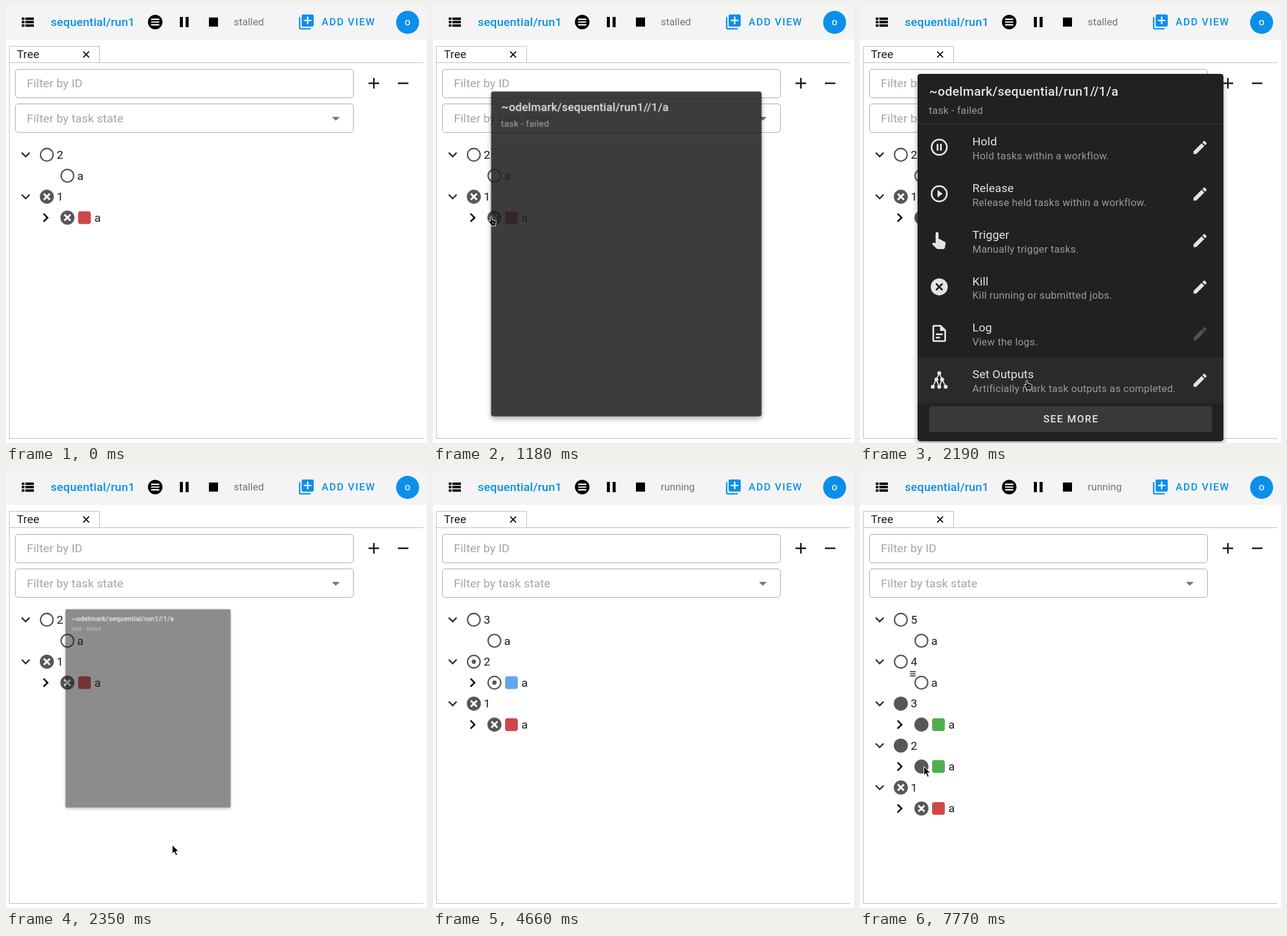
Write an HTML page that moves like this. It is 695 px wide and 721 px high and loops after 8000 ms.

```html
<!DOCTYPE html>
<html lang="en">
<head>
<meta charset="utf-8">
<title>Workflow tree</title>
<style>
  html, body { margin: 0; width: 100%; height: 100%; overflow: hidden; background: #fff; }
  svg { display: block; font: 19.2px Roboto, sans-serif; }
  text { white-space: pre; }
  .line { fill: none; stroke: currentColor; }
  .medium { font-weight: 500; }
  .caps { font-size: 16.8px; font-weight: 500; letter-spacing: 1.5px; }
  .hint { fill: #a5a5a5; letter-spacing: .15px; }
  .sub { font-size: 16.8px; letter-spacing: .27px; fill: #9a9a9a; }
  #menu { color: #e4e4e4; fill: #e4e4e4; }
  #panel { filter: drop-shadow(0 5px 5px rgba(0, 0, 0, .35)); }
</style>
</head>
<body>
<svg width="695" height="721" viewBox="0 0 695 721">
  <!-- toolbar -->
  <rect width="695" height="56" fill="#f4f4f4"/>
  <path d="M26 19h4.5v4H26zm6 0h14v4H32zM26 24.6h4.5v4H26zm6 0h14v4H32zM26 30.2h4.5v4H26zm6 0h14v4H32z"/>
  <text class="medium" x="74" y="33" fill="#0a90ea" letter-spacing=".18">sequential/run1</text>
  <circle cx="246.3" cy="26.5" r="12"/>
  <path d="M239.5 21.8h13.6M239.5 26.5h13.6M239.5 31.2h13.6" stroke="#fff" stroke-width="2.2"/>
  <path d="M287 18h5v17h-5zm9.5 0h5v17h-5zM335 19h15v15h-15z"/>
  <text id="status" x="376" y="32" font-size="16.8" fill="#757575"></text>
  <g fill="#0a90ea">
    <rect x="488" y="14" width="20" height="20" rx="2.4"/>
    <path class="line" d="M484.8 18.5V36q0 1.6 1.6 1.6H503" color="#0a90ea" stroke-width="2.3"/>
    <path d="M498 17.5v12.6M491.7 23.8h12.6" stroke="#fff" stroke-width="2.3"/>
    <text class="caps" x="521" y="32">ADD VIEW</text>
    <circle cx="663" cy="27" r="19"/>
  </g>
  <text class="medium" x="663" y="31.7" font-size="13.5" fill="#fff" text-anchor="middle">O</text>

  <!-- tab and filters -->
  <path class="line" d="M689 93.5H154.5V66.5H5.5V713.5H689M5.5 93.5H154.5" color="#bdbdbd"/>
  <text x="18" y="86" font-size="18.8" fill="#1c1c1c" letter-spacing=".1">Tree</text>
  <path class="line" d="M127.5 75.2l9.6 9.6m0-9.6l-9.6 9.6" stroke-width="1.8"/>
  <g class="line" color="#a9a9a9">
    <rect x="15.5" y="104.5" width="558" height="47" rx="4.5"/>
    <rect x="15.5" y="161.5" width="558" height="47" rx="4.5"/>
  </g>
  <text class="hint" x="34.5" y="134">Filter by ID</text>
  <text class="hint" x="34.5" y="192">Filter by task state</text>
  <path d="M538 183h13l-6.5 6.3z" fill="#757575"/>
  <path class="line" d="M598.5 127.5h17.5m-8.7-8.7v17.4M647 127.5h17.3" color="#151515" stroke-width="2.5"/>

  <g id="tree" fill="#1c1c1c"></g>

  <g id="menu">
    <rect id="panel" x="95" y="112" width="505" height="606" rx="4.5" fill="#212121"/>
    <text class="medium" x="114" y="148" font-size="21" letter-spacing=".25">~odelmark/sequential/run1//1/a</text>
    <text class="sub" x="113.5" y="178">task - failed</text>
    <path d="M95 194.5h505" stroke="#373737"/>
    <g id="items"></g>
  </g>

  <g id="cursor" stroke="#fff">
    <path id="arrow" d="M0 0V14.6l3.4-3 2.5 5.8 2.5-1.1-2.5-5.7h4.7z"/>
    <g id="hand">
      <path d="M3.6 1.5Q5 -.4 6.4 1.5V5.8l5.4 1.3q1.7.5 1.5 2.2l-.9 4v2.6H4.6v-2.2L1 9.2Q.2 7.2 2 7.3l1.6 1.2z"/>
      <path d="M7.2 9.5v3M9.7 9.5v3" stroke-width=".8"/>
    </g>
  </g>
</svg>
<script>
const LOOP = 8000;
const MENU_OPEN = 1010, ENTER = 305, MENU_CLOSE = 2244, LEAVE = 169;
const ORIGIN = [101.6, 364], ROW = 76.8, ITEMS_TOP = 195;
const $ = id => document.getElementById(id);
const clamp = v => Math.min(1, Math.max(0, v));

// cubic-bezier(x1, 0, x2, 1)
function ease(x, x1, x2) {
  x = clamp(x);
  let lo = 0, hi = 1, s;
  for (let i = 0; i < 24; i++) {
    s = (lo + hi) / 2;
    if (3 * (1 - s) ** 2 * s * x1 + 3 * (1 - s) * s * s * x2 + s ** 3 < x) lo = s; else hi = s;
  }
  return s * s * (3 - 2 * s);
}

// Menu entries; icons live in a 24 unit box
const RING = '<circle class="line" cx="12" cy="12" r="9" stroke-width="2"/>';
const ENTRIES = [
  ['Hold', 'Hold tasks within a workflow.', RING + '<path d="M9 8h2v8H9zm4 0h2v8h-2z"/>'],
  ['Release', 'Release held tasks within a workflow.', RING + '<path d="M10 7.5v9l6-4.5z"/>'],
  ['Trigger', 'Manually trigger tasks.',
    '<path d="M7.7 4a1.75 1.75 0 0 1 3.5 0v6.4l1.2.1 6 3.2q1.3.6 1.2 2l-1 5q-.4 1.6-2 1.6h-6.3q-1 0-1.7-.7L3.4 16.2l.9-.9q.6-.6 1.4-.4l2 .5z"/>'],
  ['Kill', 'Kill running or submitted jobs.',
    '<circle cx="12" cy="12" r="10"/><path d="M8.2 8.2l7.6 7.6m0-7.6l-7.6 7.6" stroke="#212121" stroke-width="2"/>'],
  ['Log', 'View the logs.',
    '<path class="line" d="M6 3h7.6L19 8.4V20q0 1-1 1H6q-1 0-1-1V4q0-1 1-1zM8 13h8M8 17h5" stroke-width="2"/><path d="M13 3v6h6z"/>'],
  ['Set Outputs', 'Artificially mark task outputs as completed.',
    '<path class="line" d="M12 4L4.4 20M12 4l7.6 16M8.6 11.5L12 20l3.4-8.5" stroke-width="1.3"/>' +
    [[12, 4], [8.6, 11.5], [15.4, 11.5], [4.4, 20], [12, 20], [19.6, 20]]
      .map(([x, y]) => `<circle cx="${x}" cy="${y}" r="2.3"/>`).join('')],
];
const PENCIL = 'M20.7 7c.4-.4.4-1 0-1.4l-2.3-2.3c-.4-.4-1-.4-1.4 0l-1.9 1.8 3.8 3.8zM3 17.25V21h3.75L17.8 9.9 14.1 6.2z';

$('items').innerHTML =
  `<rect id="hover" x="95" width="505" height="${ROW}" fill="#2a2a2a"/>` +
  ENTRIES.map(([name, note, icon], i) => `<g transform="translate(0 ${i * ROW})">
    <g transform="translate(114 216.2) scale(1.4)">${icon}</g>
    <text x="185.5" y="230.3" letter-spacing=".12">${name}</text>
    <text class="sub" x="185.5" y="253">${note}</text>
    <path d="${PENCIL}" transform="translate(547 219) scale(1.2)" opacity="${name === 'Log' ? .25 : 1}"/>
  </g>`).join('') +
  `<rect x="114" y="660" width="467" height="43" rx="4.5" fill="#393939"/>
   <text class="caps" x="348.5" y="687" text-anchor="middle">SEE MORE</text>`;

// Task states: w waiting, q queued, p preparing, s submitted, r running, d done, f failed
const JOB = { s: '#6ad7c5', r: '#61a6f0', d: '#4fae50', f: '#cf4848' };
const TREES = [
  [0, '2w 1f'],
  [2920, '3w 2p 1f'],
  [3650, '3w 2s 1f'],
  [4660, '3w 2r 1f'],
  [5140, '4w 3w 2d 1f'],
  [5670, '4w 3p 2d 1f'],
  [6150, '4w 3s 2d 1f'],
  [7160, '4w 3r 2d 1f'],
  [7650, '5w 4q 3d 2d 1f'],
];

function taskIcon(x, y, state) {
  const dot = { p: 1.5, s: 1.5, r: 3.6 }[state];
  const solid = 'df'.includes(state);
  let svg = solid
    ? `<circle cx="${x}" cy="${y}" r="11.6" fill="#575757"/>`
    : `<circle class="line" cx="${x}" cy="${y}" r="10.4" color="#575757" stroke-width="2.3"/>`;
  if (dot) svg += `<circle cx="${x}" cy="${y}" r="${dot}" fill="#575757"/>`;
  if (state === 'f') svg += `<path d="M${x - 5} ${y - 5}l10 10m0-10l-10 10" stroke="#fff" stroke-width="3.1"/>`;
  return svg;
}

function cycleRows(spec, i) {
  const [cycle, state] = spec;
  const y = 245.4 + 69.2 * i, y2 = y + 34.6, job = JOB[state];
  let svg = `<path class="line" d="M26 ${y - 3.4}l6.5 6.5 6.5-6.5" color="#333" stroke-width="2.5"/>` +
    taskIcon(67.4, y, state === 'q' ? 'w' : state) + `<text x="83.8" y="${y + 6.6}">${cycle}</text>` +
    taskIcon(101.4, y2, state) + `<text x="${job ? 146 : 117.5}" y="${y2 + 6.6}">a</text>`;
  if (job) svg += `<path class="line" d="M62 ${y2 - 6.6}l6.6 6.6-6.6 6.6" stroke-width="2.7"/>
    <rect x="119" y="${y2 - 10.5}" width="21" height="21" rx="4" fill="${job}"/>`;
  if (state === 'q') svg += `<path class="line" d="M82.5 ${y2 - 18.2}h9.3m-9.3 3.5h9.3m-9.3 3.5h9.3" color="#575757" stroke-width="1.9"/>`;
  return svg;
}

let shown;
function drawTree(t) {
  const tree = TREES.filter(([start]) => start <= t).pop()[1];
  if (tree === shown) return;
  shown = tree;
  $('tree').innerHTML = tree.split(' ').map(cycleRows).join('');
}

// Pointer way points: time, x, y, ease-out power of the move leading there
const PATHS = [
  [[500, 0, 395], [820, 95, 347, 1.8], [1400, 95, 347, 1], [1750, 261, 540, 1],
   [1990, 274.5, 617, 2], [2400, 274.5, 617, 1], [2560, 7, 626, 1]],
  [[6560, 15, 624], [7280, 105.5, 487.5, 1.8], [LOOP, 105.5, 487.5, 1]],
];

function pointer(t) {
  const path = PATHS.find(p => t >= p[0][0] && t < p[p.length - 1][0]);
  if (!path) return null;
  const n = path.findIndex(p => p[0] > t);
  const [t0, x0, y0] = path[n - 1], [t1, x1, y1, power] = path[n];
  const k = 1 - (1 - (t - t0) / (t1 - t0)) ** power;
  return [x0 + (x1 - x0) * k, y0 + (y1 - y0) * k];
}

function drawPointer(t, pos) {
  $('cursor').style.display = pos ? '' : 'none';
  if (!pos) return;
  const hand = (t >= 780 && t < 2300) || (t >= 7240 && t < 7650);
  $('arrow').style.display = hand ? 'none' : '';
  $('hand').style.display = hand ? '' : 'none';
  $('cursor').setAttribute('transform', `translate(${pos[0] - (hand ? 4 : 0)} ${pos[1]})`);
}

function drawMenu(t, pos) {
  const visible = t > MENU_OPEN && t < MENU_CLOSE + LEAVE;
  $('menu').style.display = visible ? '' : 'none';
  if (!visible) return;
  const closing = t > MENU_CLOSE;
  const k = closing
    ? 1 - ease((t - MENU_CLOSE) / LEAVE, .4, 1)
    : ease((t - MENU_OPEN) / ENTER, 0, .2);
  const fade = closing
    ? 1 - ease((t - MENU_CLOSE) / (2 * LEAVE), .4, .2) / .2
    : (ease((t - MENU_OPEN) / (2 * ENTER), .4, .2) - .33) / .67;
  const scale = .04 + .96 * k, [ox, oy] = ORIGIN;
  $('menu').setAttribute('transform',
    `translate(${ox} ${oy}) scale(${scale}) translate(${-ox} ${-oy})`);
  $('menu').setAttribute('opacity', k);
  $('items').setAttribute('opacity', clamp(fade));
  const row = Math.floor((pos[1] - ITEMS_TOP) / ROW);
  $('hover').setAttribute('y', ITEMS_TOP + row * ROW);
}

const start = performance.now();
function draw() {
  const t = (performance.now() - start) % LOOP;
  const pos = pointer(t);
  $('status').textContent = t < 3650 ? 'stalled' : 'running';
  drawTree(t);
  drawMenu(t, pos);
  drawPointer(t, pos);
  requestAnimationFrame(draw);
}
draw();
</script>
</body>
</html>
```
